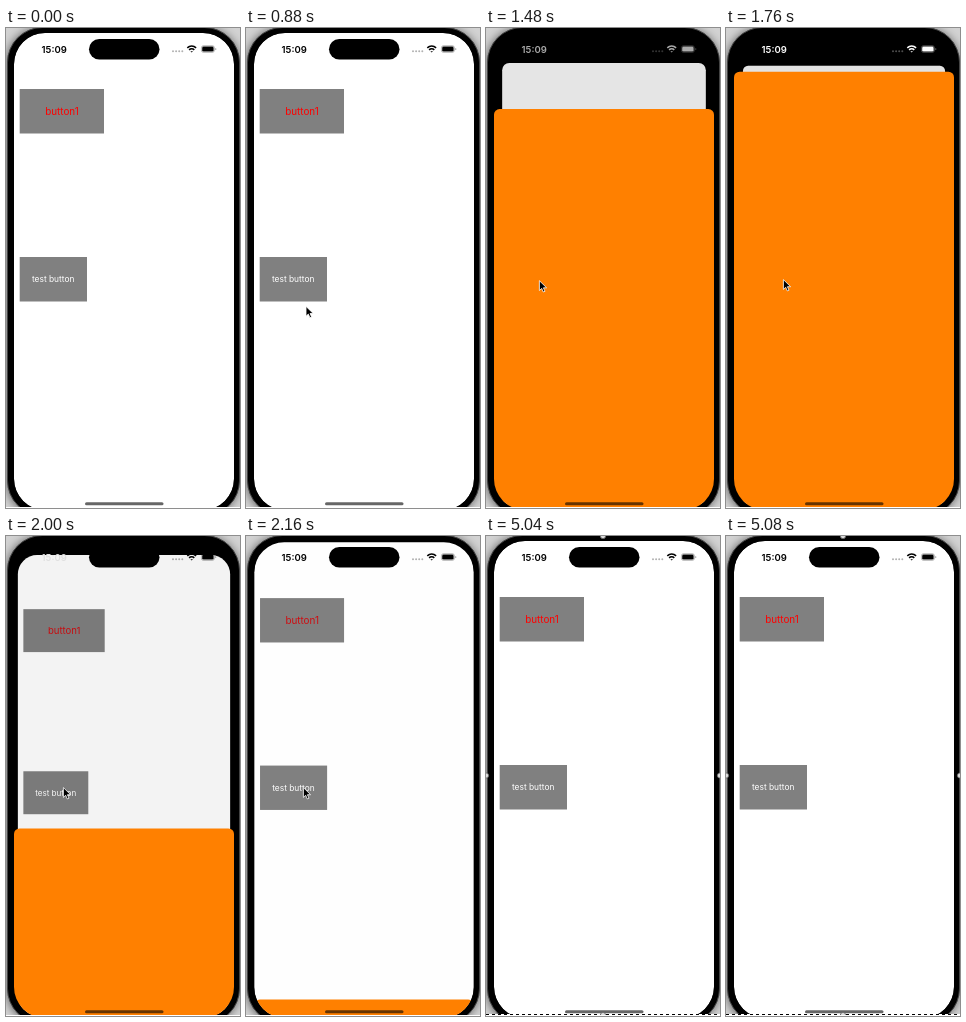
Animation, 234 px wide and 480 px high, one loop 6880 ms. Source, as an HTML page:

```html
<!DOCTYPE html>
<html lang="en">
<head>
<meta charset="utf-8">
<title>Sheet presentation</title>
<style>
  html, body { margin: 0; width: 100%; height: 100%; overflow: hidden; background: #fff; }
  svg { display: block; font-family: Inter, Roboto, sans-serif; }
</style>
</head>
<body>
<svg width="234" height="480" viewBox="0 0 234 480">
  <defs>
    <clipPath id="screen"><rect x="8" y="5" width="220" height="477" rx="31"/></clipPath>
    <filter id="blur" x="-20%" y="-20%" width="140%" height="140%"><feGaussianBlur stdDeviation="5"/></filter>
  </defs>

  <rect width="234" height="480" fill="#d2d2d2"/>
  <rect x="1" y="0" width="232" height="488" rx="35" opacity=".6" filter="url(#blur)"/>
  <rect x="1.5" y="-.5" width="232" height="488" rx="35" stroke="#444"/>

  <g clip-path="url(#screen)">
    <g id="page">
      <rect id="card" x="8" y="5" width="220" height="477" fill="#fff"/>
      <rect x="13.7" y="61" width="84.3" height="44.5" fill="#808080"/>
      <text id="first" x="56" y="86.8" font-size="9.9" text-anchor="middle">button1</text>
      <rect x="13.7" y="229" width="67.3" height="44.5" fill="#808080"/>
      <text id="second" x="47.2" y="254.2" font-size="8.4" text-anchor="middle" fill="#fff">test button</text>
      <rect id="dim" x="8" y="5" width="220" height="477"/>
    </g>
    <rect id="sheet" x="8" width="220" height="500" rx="5.6" fill="#ff8000"/>
    <rect x="79" y="474.3" width="78.5" height="3" rx="1.5" opacity=".6"/>
  </g>

  <rect x="83" y="11" width="70.5" height="20.5" rx="10.25"/>
  <text id="clock" x="35.6" y="24.6" font-size="9.5" font-weight="600">15:09</text>
  <g id="icons">
    <path d="M167 23.2h10" stroke="currentColor" stroke-width="2" stroke-linecap="round" stroke-dasharray="0 3.1" opacity=".3"/>
    <g fill="none" stroke="currentColor" stroke-width="1.5">
      <path d="M181.3 19.9a6.3 6.3 0 0 1 8.8 0M183.1 21.9a3.7 3.7 0 0 1 5.2 0"/>
      <path d="M184.4 23.2h2.6l-1.3 1.4z" fill="currentColor" stroke="none"/>
    </g>
    <rect x="195.4" y="17.7" width="13" height="6.7" rx="2.1" fill="none" stroke="currentColor" stroke-width=".6" opacity=".45"/>
    <rect x="196.2" y="18.5" width="11.4" height="5.1" rx="1.4" fill="currentColor"/>
    <path d="M209.4 20v2.2q1-.3 1-1.1t-1-1.1" fill="currentColor" opacity=".45"/>
  </g>

  <path id="cursor" d="M0 0v9.8l2.3-2.1 1.6 3.6 1.7-.7-1.6-3.5h3.2z" stroke="#fff" stroke-width=".8"/>

  <g id="selection">
    <path d="M0 478.5h234" stroke="#fff"/>
    <path d="M0 478.5h234" stroke="#000" stroke-dasharray="3 3"/>
    <g fill="#ddd" stroke="#666" stroke-width=".8">
      <circle cx="117" cy="0" r="2.6"/><circle cx="117" cy="479" r="2.6"/>
      <circle cx="0" cy="239.5" r="2.6"/><circle cx="234" cy="239.5" r="2.6"/>
    </g>
  </g>
  <rect y="479" width="234" height="1" fill="#fff"/>
</svg>
<script>
const LOOP = 6880, STEP = 40;
const el = id => document.getElementById(id);
const set = (id, attrs) => { for (const k in attrs) el(id).setAttribute(k, attrs[k]); };
const clamp = v => Math.max(0, Math.min(1, v));
const ramp = (t, from, to) => clamp((t - from) / (to - from));
const gray = v => `rgb(${[v, v, v].map(c => Math.round(c * 255))})`;

// Critically damped spring, from 0 to 1
const spring = ms => {
  const x = Math.max(0, ms) * .0195;
  return 1 - (1 + x) * Math.exp(-x);
};

// Cursor tip: time, x, y
const path = [
  [520, 88, 387], [1160, 53.4, 252.7], [1640, 53.4, 252.7], [1760, 57.4, 251.6], [2520, 57.4, 251.6],
  [2560, 57.4, 252.6], [3000, 57.4, 252.6], [3040, 57.4, 251.6], [3160, 57.4, 251.6], [3280, 108, 56]
];

function cursorAt(t) {
  const i = Math.max(1, path.findIndex(k => k[0] >= t));
  const [a, b] = [path[i - 1], path[i]];
  let k = ramp(t, a[0], b[0]);
  if (i === 1) k = 1 - (1 - k) ** 2;
  return [1, 2].map(n => a[n] + (b[n] - a[n]) * k);
}

function draw(t) {
  let p = 0;
  if (t >= 1240 && t < 1920) p = spring(t - 1271);
  else if (t >= 1920 && t < 2440) p = 1 - spring(t - 1902);

  const scale = 1 - .0814 * p;
  set('page', { transform: `translate(118 ${5 + 32.8 * p}) scale(${scale}) translate(-118 -5)` });
  // The card's corners tighten from the screen radius to the sheet radius
  const radius = 31 - 25.4 * p;
  set('card', { rx: radius });
  set('dim', { rx: radius, opacity: .11 * p });
  set('sheet', { y: 480.8 - 437.5 * p });

  set('first', { fill: t >= 1920 && t < 2400 ? '#d00c10' : '#f00' });
  set('second', { opacity: t < 1200 ? 1 : ramp(t, 1340, 1700) });

  const light = ramp(t, 1340, 1550);
  set('clock', { fill: gray(light * (1 - ramp(t, 1980, 2140))) });
  set('icons', { color: gray(t < 2000 ? light : 0) });

  const shown = t >= 520 && t < 3320;
  set('cursor', { visibility: shown ? 'visible' : 'hidden' });
  if (shown) set('cursor', { transform: `translate(${cursorAt(t)})` });
  set('selection', { visibility: t >= 5040 ? 'visible' : 'hidden' });
}

const start = performance.now();
function tick() {
  const t = (performance.now() - start) % LOOP;
  draw(Math.floor(t / STEP) * STEP);
  requestAnimationFrame(tick);
}
tick();
</script>
</body>
</html>
```
